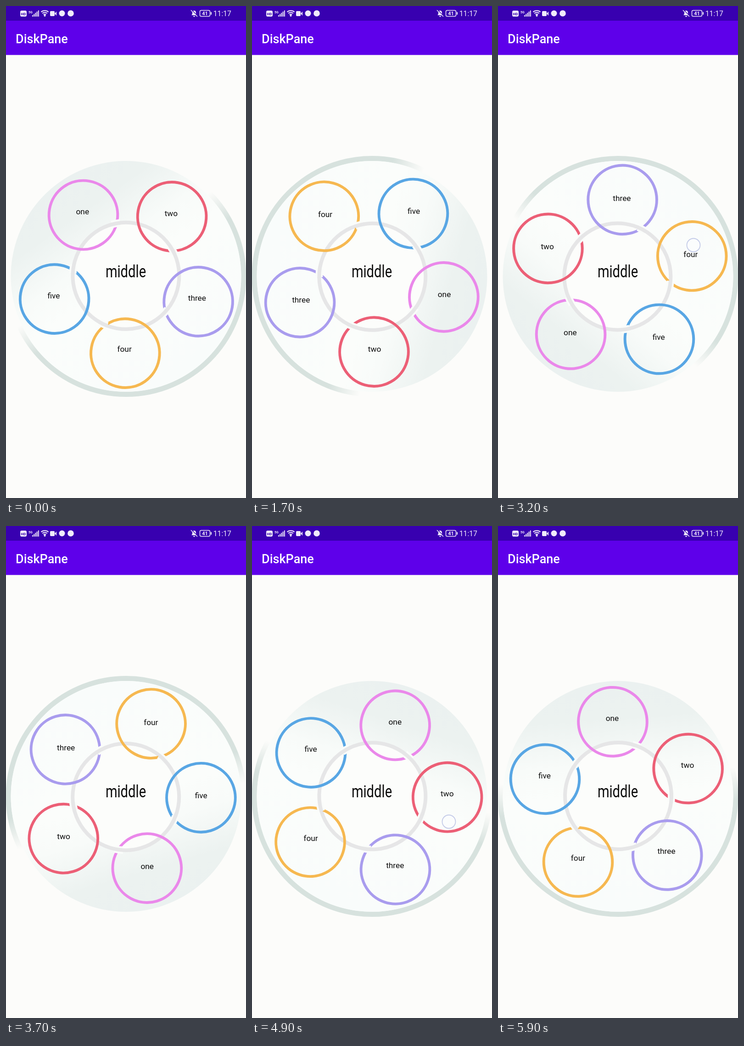
Animation of 523x1070 px, one loop 6 s. Source, as an HTML page with a canvas:

```html
<!DOCTYPE html>
<html lang="en">
<head>
<meta charset="utf-8">
<title>DiskPane</title>
<style>
  html, body { margin: 0; width: 100%; height: 100%; overflow: hidden; background: #fcfcfa; }
  canvas { display: block; }
</style>
</head>
<body>
<canvas id="stage" width="523" height="1070"></canvas>
<script>
const g = document.getElementById('stage').getContext('2d');
const LOOP = 6000, STEP = 100, RAD = Math.PI / 180, TAU = Math.PI * 2;
const CX = 261.5, CY = 588;
const DISC = 251, ORBIT = 164.3, HUB = 116, RING = 74.8;
// label, colour, orbit radius
const RINGS = [
  ['one', '#ea88ea', 164.3], ['two', '#ec5f76', 164.3], ['three', '#a99cee', 165.4],
  ['four', '#f6b850', 166.1], ['five', '#58a6e4', 164.3]
];
// [time in ms, wheel angle in degrees clockwise]
const SPIN = [
  [0, -35], [300, -35], [500, 40], [800, 250], [1100, 312], [1450, 345],
  [1800, 520], [2100, 640], [2400, 712.4], [2800, 860], [3200, 939.1],
  [3400, 1020], [3600, 1190], [3800, 1272], [4300, 1286.3], [4500, 1304],
  [4900, 1458], [5100, 1600], [5400, 1725], [5900, 1795.8], [6000, 1798]
];
// [time, x, y] of the finger for each stroke
const STROKES = [
  [[3200, 426, 520], [3600, 428, 690]],
  [[4300, 429, 507], [4500, 429, 521], [4900, 429, 643], [5100, 426, 740]]
];

const slope = (i) => (SPIN[i + 1][1] - SPIN[i][1]) / (SPIN[i + 1][0] - SPIN[i][0]);

function tangent(i) {
  if (i === 0 || i === SPIN.length - 1) return 0;
  const a = slope(i - 1), b = slope(i);
  return a * b > 0 ? 2 * a * b / (a + b) : 0;
}

// Monotone cubic through the spin keys
function wheelAngle(t) {
  let i = 0;
  while (i < SPIN.length - 2 && t >= SPIN[i + 1][0]) i++;
  const [t0, a] = SPIN[i], [t1, b] = SPIN[i + 1];
  const h = t1 - t0, u = (t - t0) / h, v = 1 - u;
  return a * v * v * (1 + 2 * u) + b * u * u * (3 - 2 * u)
    + h * u * v * (v * tangent(i) - u * tangent(i + 1));
}

function fingerAt(t) {
  for (const s of STROKES) {
    for (let i = 0; i < s.length - 1; i++) {
      const [t0, x0, y0] = s[i], [t1, x1, y1] = s[i + 1];
      if (t < t0 || t >= t1) continue;
      const u = (t - t0) / (t1 - t0);
      return [x0 + (x1 - x0) * u, y0 + (y1 - y0) * u];
    }
  }
  return null;
}

function arc(x, y, r, color, width, from = 0, to = TAU) {
  g.beginPath();
  g.arc(x, y, r, from, to);
  g.strokeStyle = color;
  g.lineWidth = width;
  g.stroke();
}

function disc(x, y, r, color) {
  g.beginPath();
  g.arc(x, y, r, 0, TAU);
  g.fillStyle = color;
  g.fill();
}

function box(x, y, w, h, color, r = 0) {
  g.beginPath();
  g.roundRect(x, y, w, h, r);
  g.fillStyle = color;
  g.fill();
}

function text(str, x, y, size, color, align = 'center', weight = 400) {
  g.font = `${weight} ${size}px Roboto, sans-serif`;
  g.textAlign = align;
  g.fillStyle = color;
  g.fillText(str, x, y);
}

function line(color, width, ...pts) {
  g.beginPath();
  pts.forEach(([x, y]) => g.lineTo(x, y));
  g.strokeStyle = color;
  g.lineWidth = width;
  g.stroke();
}

function gradient(y0, y1, stops) {
  const grad = g.createLinearGradient(0, y0, 0, y1);
  stops.forEach(([p, c]) => grad.addColorStop(p, c));
  return grad;
}

function drawBars() {
  const dark = '#3800b0', ink = '#f0ecfa';
  box(0, 0, 523, 32, dark);
  box(0, 32, 523, 74.5, '#5e00ea');
  text('DiskPane', 21, 81, 27, '#fff', 'left', 500);

  box(31, 10, 14, 13, ink, 3);
  text('HD', 38, 19.5, 8, dark, 'center', 700);
  text('5G', 49, 16, 7, ink, 'left', 700);
  for (let i = 0; i < 5; i++) box(57 + i * 3.2, 20 - i * 2.6, 2, 3 + i * 2.6, ink);
  for (const r of [4, 8, 12]) arc(84.5, 22, r, ink, 2, -2.3, -0.84);
  disc(84.5, 21, 2, ink);
  box(96, 11, 10, 11, ink, 2);
  g.beginPath();
  g.moveTo(106, 16.5);
  g.lineTo(110, 12);
  g.lineTo(110, 21);
  g.fill();
  disc(122, 16, 6.5, ink);
  disc(141, 16, 6.8, ink);

  // Muted bell
  g.beginPath();
  g.moveTo(404, 20);
  g.quadraticCurveTo(406, 19, 406, 15);
  g.quadraticCurveTo(406, 10, 410, 10);
  g.quadraticCurveTo(414, 10, 414, 15);
  g.quadraticCurveTo(414, 19, 416, 20);
  g.fill();
  line(dark, 1.5, [404.5, 8.5], [418, 22]);
  line(ink, 1.5, [403, 9], [417, 23]);
  box(408, 21.5, 4, 2, ink, 1);

  g.beginPath();
  g.roundRect(422.5, 9.5, 22, 13, 3);
  g.strokeStyle = ink;
  g.lineWidth = 1.5;
  g.stroke();
  box(446, 13, 2, 6, ink, 1);
  text('41', 433.5, 20, 11, ink, 'center', 600);
  text('11:17', 491, 22, 15.8, ink, 'right');
}

function drawWheel(angle) {
  g.save();
  g.translate(CX, CY);
  g.rotate(angle * RAD);

  const rim = gradient(-45, 25, [[0, 'rgba(215,226,222,0)'], [1, '#d7e2de']]);
  arc(0, 0, 256.5, rim, 11, -10 * RAD, 190 * RAD);
  disc(0, 0, DISC, gradient(-DISC, DISC, [
    [0, '#ebf1f0'], [0.16, '#ecf2f0'], [0.36, '#f8fbf9'], [0.5, '#fbfdfb'], [1, '#f9fcfb']
  ]));

  const hx = 0.6, hy = -1, gray = '#e6e6e7';
  disc(hx, hy, HUB, '#fcfdfb');
  arc(hx, hy, HUB, gray, 8);

  RINGS.forEach(([, color, orbit], i) => {
    const a = i * 72 * RAD;
    arc(0.4 + orbit * Math.sin(a), 1.6 - orbit * Math.cos(a), RING, color, 6);
  });

  // The hub passes over each ring at its clockwise crossing
  RINGS.forEach((_, i) => {
    const mid = (i * 72 + 24.2 - 90) * RAD;
    arc(hx, hy, HUB, '#fafcfa', 16, mid - 0.08, mid + 0.08);
    arc(hx, hy, HUB, gray, 8, mid - 0.09, mid + 0.09);
  });
  g.restore();

  RINGS.forEach(([label], i) => {
    const a = (angle + i * 72) * RAD;
    text(label, 261 + ORBIT * Math.sin(a), CY - ORBIT * Math.cos(a), 17.3, '#0c0c0c');
  });

  // Narrow lettering
  g.save();
  g.translate(261, 590);
  g.scale(0.8, 1);
  text('middle', 0, 0, 36.5, '#0c0c0c');
  g.restore();
}

function draw(now) {
  const t = Math.floor((now % LOOP) / STEP) * STEP;
  box(0, 0, 523, 1070, '#fcfcfa');
  drawBars();
  drawWheel(wheelAngle(t));
  const finger = fingerAt(t);
  if (finger) {
    disc(...finger, 15, 'rgba(252,253,255,0.6)');
    arc(...finger, 14.5, 'rgba(186,194,228,0.85)', 1.8);
  }
}

const start = performance.now();
function tick() {
  draw(performance.now() - start);
  requestAnimationFrame(tick);
}
tick();
</script>
</body>
</html>
```
